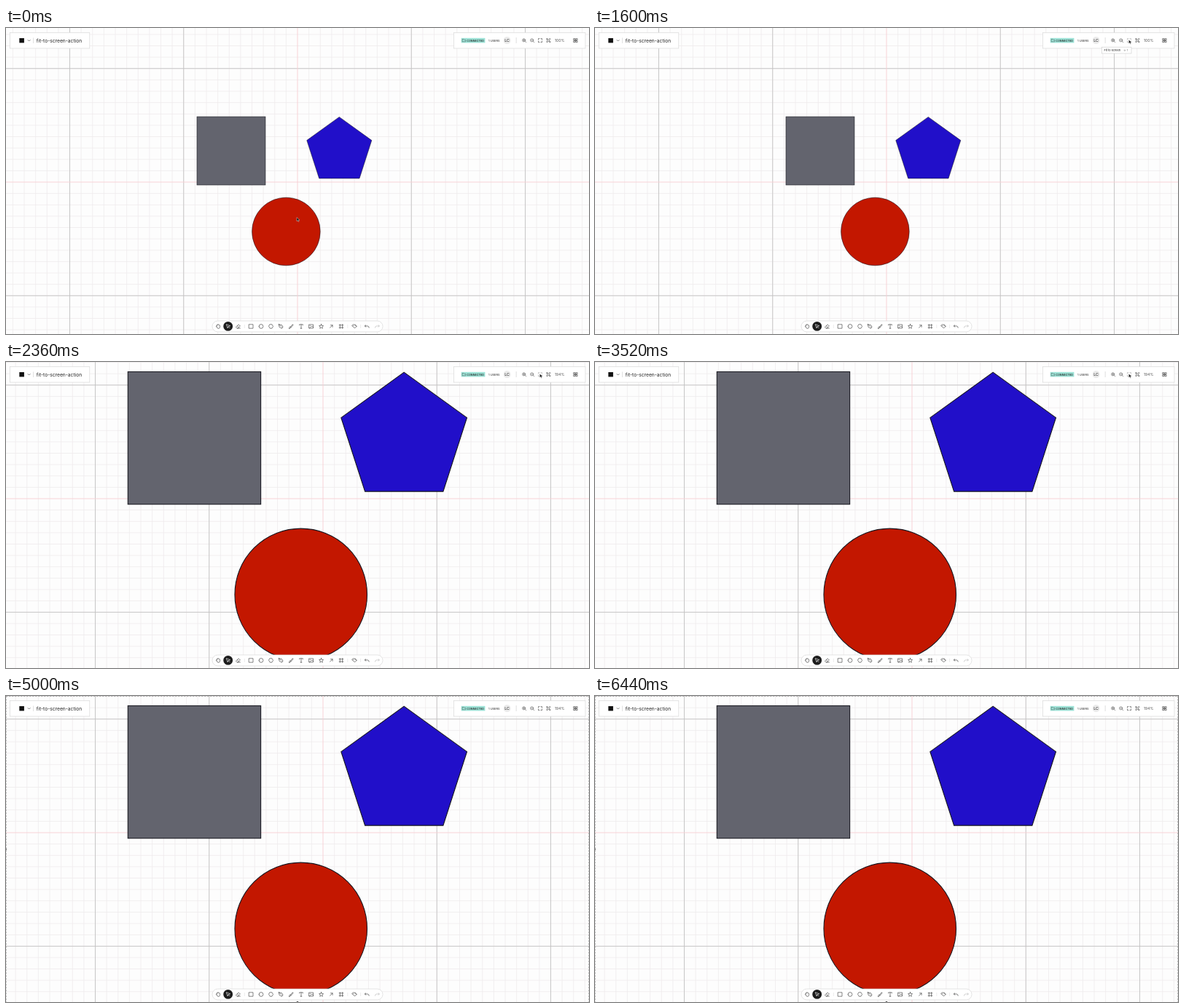
These frames come from a looping animation (800 by 421 pixels, 6720 ms). An HTML page:

```html
<!DOCTYPE html>
<html lang="en">
<head>
<meta charset="utf-8">
<title>Fit to screen</title>
<style>
  html, body { margin: 0; height: 100%; overflow: hidden; background: #fdfdfd; }
  svg { display: block; width: 100vw; height: 100vh; }
  text { font-family: Inter, sans-serif; fill: #222; }
  .panel { fill: #fff; stroke: #d9d9d9; stroke-width: .7; }
  .icon { fill: none; stroke: #333; stroke-width: .6; stroke-linecap: round; stroke-linejoin: round; }
  .divider { stroke: #ccc; stroke-width: .6; }
</style>
</head>
<body>
<svg viewBox="0 0 800 421">
  <g id="grid" fill="none">
    <path id="minor" stroke="#efebec" stroke-width=".8"/>
    <path id="major" stroke="#c2c2c2" stroke-width=".9"/>
    <path d="M-500 0H500M0 -400V400" stroke="#f8cfd3" stroke-width=".9"/>
  </g>

  <g id="shapes" stroke="#14141c" stroke-width=".55">
    <rect x="-138" y="-90" width="94" height="94" fill="#63646e"/>
    <path d="M57.3 -89.6L101.8 -57.4L85 -5.1H29.7L12.8 -57.4Z" fill="#210fc9"/>
    <circle cx="-15.6" cy="68" r="46.8" fill="#c31700"/>
  </g>

  <rect class="panel" x="5.3" y="6.3" width="109.5" height="21.7"/>
  <rect x="18.3" y="14" width="6.6" height="6.4" fill="#111"/>
  <path class="icon" d="M30 16.4l1.6 1.6l1.6 -1.6"/>
  <path class="divider" d="M37.5 13.5v7.5"/>
  <text x="41.8" y="19.7" font-size="6.7">fit-to-screen-action</text>

  <rect class="panel" x="614.5" y="6.3" width="180.5" height="21.7"/>
  <rect x="624.7" y="13.8" width="32.7" height="6.6" fill="#9ce2d6"/>
  <path class="icon" d="M626.5 15.5h1.6l.7 .8h1.8v2.5h-4.1z" style="stroke-width:.4"/>
  <text x="632.2" y="18.5" font-size="3.75" font-weight="500">CONNECTED</text>
  <text x="662" y="18.5" font-size="3.9">1 USERS</text>
  <circle cx="687.6" cy="17.1" r="5" fill="#ebebeb"/>
  <text x="687.6" y="19.1" font-size="5.4" text-anchor="middle">LC</text>
  <path class="divider" d="M700.2 13v8"/>
  <text id="zoom" x="753" y="19" font-size="5.1" style="fill:#555"></text>

  <rect class="panel" x="283" y="403" width="234" height="15" rx="7.5"/>
  <circle cx="304.7" cy="410.4" r="6.4" fill="#1c1c1c"/>
  <path class="divider" d="M327.3 408v5M468.8 408v5M486.6 408v5" opacity=".6"/>

  <g id="icons"></g>

  <g id="tooltip">
    <rect x="695.4" y="26.2" width="40.6" height="8.8" fill="#fff" stroke="#ccc" stroke-width=".6"/>
    <text x="698.6" y="32" font-size="3.85">Fit to screen</text>
    <text x="725" y="32" font-size="3.7" style="font-family:Inter,'DejaVu Sans',sans-serif;fill:#777">⇧ 1</text>
  </g>

  <path id="cursor" d="M0 0V5.2L1.3 4.1L2.2 6L3.1 5.6L2.2 3.7L3.9 3.6Z" fill="#111" stroke="#fff" stroke-width=".4"/>

  <g id="frame" fill="none" stroke="#8a8a8a">
    <path d="M0 .3H800M.2 0V421M799.8 0V421" stroke-width=".7" stroke-dasharray="2.5 1.5"/>
    <path d="M0 209.7v2.4M398.8 420.8h2.4" stroke="#555" stroke-width="1.4"/>
  </g>
</svg>

<script>
const LOOP = 6720, FIT_AT = 1760;
const $ = id => document.getElementById(id);

const lens = 'M1.8 -.3A2.1 2.1 0 1 1 -2.4 -.3A2.1 2.1 0 1 1 1.8 -.3M1.3 1.3L2.8 2.8';
const undo = 'M-1.6 -1.8L-3 -.5L-1.5 .8M-3 -.5H.8Q2.7 -.4 2.8 1.8';

// Each icon: x, y, path around its centre, colour
const icons = [
  [291, 410.5, 'M-1.9 .7L-2.7 -.3Q-2.4 -1.2 -1.5 -.4V-2.2Q-.9 -2.8 -.5 -2.2V-2.7Q.1 -3.2 .6 -2.6V-2.2Q1.2 -2.7 1.6 -2V-1.4Q2.3 -1.7 2.6 -1V.9Q2.3 3 .3 3Q-1.1 2.8 -1.9 .7'],
  [304.7, 410.4, 'M-2.3 -2.3L-.6 2.6L.3 .4L2.6 -.5ZM.3 .4L2.4 2.5', '#fff'],
  [318.6, 410.5, 'M-2.9 .8L.6 -2.6L2.8 -.4L-.3 2.6H-1.3ZM-1.3 -.7L1 1.5M-1 2.6H2.8'],
  [336.3, 410.5, 'M-2.7 -2.7H2.7V2.7H-2.7Z'],
  [350, 410.5, 'M-2.9 0A2.9 2.9 0 1 1 2.9 0A2.9 2.9 0 1 1 -2.9 0'],
  [363.6, 410.5, 'M-1.4 -2.7H1.4L2.9 0L1.4 2.7H-1.4L-2.9 0Z'],
  [377.3, 410.5, 'M-2.8 -2.8L1.4 -1.7L2.3 .8L.5 2.4L-1.7 1.4ZM-2.8 -2.8L0 0M1 2.8L2.8 1'],
  [391.2, 410.5, 'M-2.8 2.8Q-2.6 .3 -.9 .5Q.6 1.6 -.8 2.5ZM-.7 .5L2 -2.6Q3 -2.9 2.7 -1.8L.1 1.2'],
  [405, 410.5, 'M-2.4 -1.7V-2.6H2.4V-1.7M0 -2.6V2.7M-.9 2.7H.9'],
  [418.8, 410.5, 'M-2.8 -2.5H2.8V2.5H-2.8ZM-2.4 2.4L1 -.3L2.8 1.2M-1.6 -1.1h.5'],
  [432.6, 410.5, 'M0 -3L.9 -1L3 -.8L1.4 .7L1.8 2.8L0 1.7L-1.8 2.8L-1.4 .7L-3 -.8L-.9 -1Z'],
  [446.3, 410.5, 'M-1.7 1.8L1.7 -1.6M-.9 -1.7H1.8V1'],
  [460, 410.5, 'M-1.7 -2.9V2.9M1.7 -2.9V2.9M-2.9 -1.7H2.9M-2.9 1.7H2.9'],
  [478, 410.5, 'M-2.9 -1.5L-1.6 -2.4H.8L3 .1L.8 2.4L-2.5 0ZM-1.2 -.9h.2M1.2 -2.2L3 .1'],
  [495.4, 410.5, undo],
  [509.3, 410.5, undo.replace(/(-?[\d.]+) (-?[\d.]+)/g, (_, x, y) => `${-x} ${y}`).replace('H.8', 'H-.8'), '#b5b5b5'],
  [711, 17.1, lens + 'M-1.4 -.3H.8M-.3 -1.4V.8', '#555'],
  [722, 17.1, lens + 'M-1.4 -.3H.8', '#555'],
  [733, 17.1, 'M-2.5 -1V-2.5H-1M1 -2.5H2.5V-1M2.5 1V2.5H1M-1 2.5H-2.5V1', '#333'],
  [744.4, 17.1, 'M-2.5 -1.2V-2.5H-1.2M1.2 -2.5H2.5V-1.2M2.5 1.2V2.5H1.2M-1.2 2.5H-2.5V1.2M-1.2 -1.2H1.2V1.2H-1.2ZM-2.4 -2.4L-1.2 -1.2M2.4 2.4L1.2 1.2', '#555'],
  [781.6, 17.1, 'M-2.5 -2.5H-.6V-.6H-2.5ZM.6 -2.5H2.5V-.6H.6ZM-2.5 .6H-.6V2.5H-2.5ZM.6 .6H2.5V2.5H.6ZM-.6 -.6L.6 .6M.6 -.6L-.6 .6', '#333'],
];
$('icons').innerHTML = icons.map(([x, y, d, color = '#333']) =>
  `<path class="icon" d="${d}" transform="translate(${x} ${y})" style="stroke:${color}"/>`).join('');
const fitIcon = $('icons').children[18];

function gridPath(step) {
  let d = '';
  for (let p = -40 * step; p <= 40 * step; p += step)
    if (p && Math.abs(p) < 500) d += `M${p} -400V400M-500 ${p}H500`;
  return d;
}
$('minor').setAttribute('d', gridPath(15.625));
$('major').setAttribute('d', gridPath(156.25));

const progress = (t, from, to) => Math.min(1, Math.max(0, (t - from) / (to - from)));
const ease = p => p * p * (3 - 2 * p);
const mix = (a, b, p) => a + (b - a) * p;

function draw(t) {
  const fitted = t >= FIT_AT;
  const origin = fitted ? '435 188' : '400 212';
  $('grid').setAttribute('transform', `translate(${origin})`);
  $('shapes').setAttribute('transform', `translate(${origin}) scale(${fitted ? 1.94 : 1})`);
  $('zoom').textContent = fitted ? '194%' : '100%';

  const reach = ease(progress(t, 480, 1320));
  const leave = ease(progress(t, 4520, 4760));
  const x = mix(399, 732.4, reach) - 8 * leave;
  const y = mix(260.6, 16.2, reach) - 26 * leave;
  $('cursor').setAttribute('transform', `translate(${x} ${y})`);

  const hover = Math.abs(x - 733) < 5 && Math.abs(y - 17) < 6;
  fitIcon.style.opacity = hover ? .45 : 1;
  $('tooltip').style.opacity = fitted ? 0 : progress(t, 1400, 1520);
  $('frame').style.opacity = t >= 4600 ? 1 : 0;
}

function tick() {
  draw(performance.now() % LOOP);
  requestAnimationFrame(tick);
}
tick();
</script>
</body>
</html>
```
